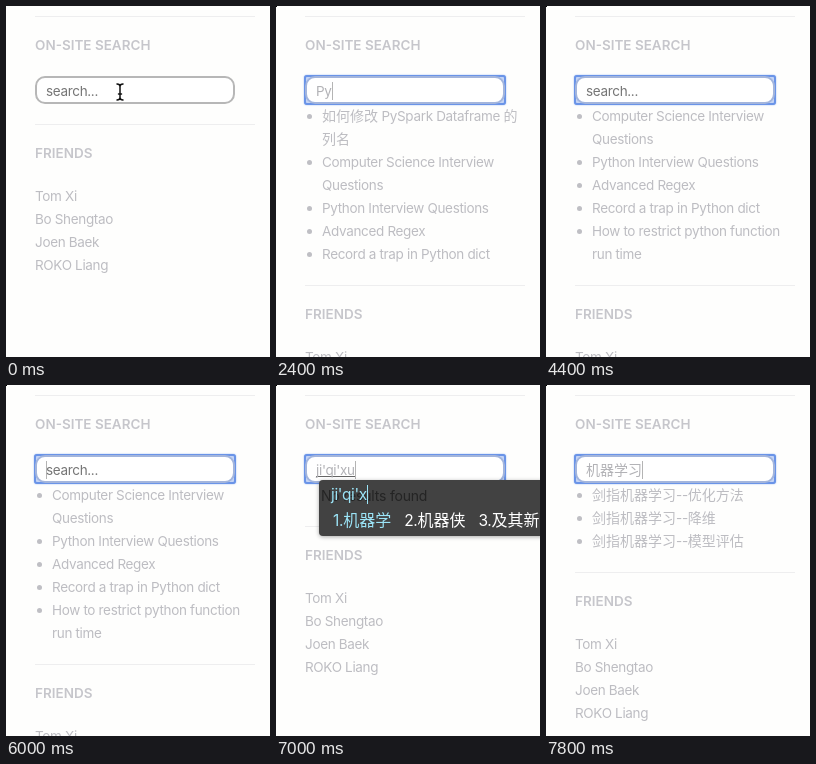
Animation of 264x351 px, one loop 8 s. Source, as an HTML page:

```html
<!DOCTYPE html>
<html lang="en">
<head>
<meta charset="utf-8">
<style>
  html, body { margin: 0; width: 100%; height: 100%; overflow: hidden; background: #fefefd; }
  body { position: relative; color: #bdbdc2; white-space: pre;
    font: 400 13.5px/23px Inter, "Noto Sans CJK SC", "Noto Sans CJK", sans-serif; letter-spacing: -.33px; }
  div, svg { position: absolute; box-sizing: border-box; }
  p { margin: 0; height: 23px; position: relative; }
  i { font: 400 14px/0 "Noto Sans CJK SC", "Noto Sans CJK", sans-serif; letter-spacing: 0; }
  .rule { left: 29px; width: 220px; height: 1px; background: #eeeeef; }
  .head { left: 29px; font-weight: 600; letter-spacing: 0; color: #c6c6cb; }
  #corner { left: 0; top: 0; width: 1px; height: 1px; background: #000; }
  #box { left: 29px; top: 70px; width: 200px; height: 28px; border: 2px solid #b7b7b7; border-radius: 10px; background: #fff; }
  #box.on { border-color: #a3b5dc; }
  #ring { left: 28px; top: 69px; width: 202px; height: 30px; border: 2px solid #6a94e8; border-radius: 3px;
    background: #c3d3f5; box-shadow: 0 0 1.5px #7fa5ee; }
  #field { left: 40px; top: 74px; color: #b2b2b6; }
  .hint { color: #757575; }
  .raw { border-bottom: 1.5px solid #666; display: inline-block; height: 17px; line-height: 23px; }
  #caret { display: inline-block; width: 1px; height: 18px; margin-right: -1px; vertical-align: -4px; background: #b4b4b4; }
  #list { left: 46px; top: 99px; }
  .dot::before { content: ""; position: absolute; left: -15.5px; top: 9px; width: 5px; height: 5px; border-radius: 50%; background: #bfbfc4; }
  #pop { left: 43px; top: 95px; width: 240px; height: 56px; border-radius: 4px; background: #424242; box-shadow: 0 1px 4px #0005; }
  #note { left: 2px; top: 4px; color: #242424; font-size: 14px; letter-spacing: -.2px; }
  #spell { left: 12px; top: 3px; font-size: 15.5px; color: #9be4f7; }
  #spell span { border-right: 1px solid #9be4f7; }
  #picks { left: 14px; top: 29px; display: flex; gap: 13px; color: #fff; font-size: 15.5px; }
  #picks > :first-child { color: #9be4f7; }
  #picks i { font-size: 16px; }
</style>
</head>
<body>
<div class="rule" style="top:10px"></div>
<div class="head" style="top:28px">ON-SITE SEARCH</div>
<div id="ring"></div>
<div id="box"></div>
<div id="field"></div>
<div id="list"></div>
<div id="friends" style="left:0;top:0">
  <div class="rule" style="top:118px"></div>
  <div class="head" style="top:136px">FRIENDS</div>
  <div style="left:29px;top:179px"><p>Tom Xi</p><p>Bo Shengtao</p><p>Joen Baek</p><p>ROKO Liang</p></div>
</div>
<div id="pop"><div id="note">No results found</div><div id="spell"></div><div id="picks"></div></div>
<svg id="mouse" width="16" height="24" viewBox="-8 -12 16 24" style="left:0;top:0" fill="none" stroke-linecap="round">
  <defs><path id="beam" d="M-3-8Q0-8 0-5.5Q0-8 3-8M0-5.5V5.5M-3 8Q0 8 0 5.5Q0 8 3 8M-1.5 2H1.5"/></defs>
  <use href="#beam" stroke="#fff" stroke-width="3.4"/>
  <use href="#beam" stroke="#111" stroke-width="1.5"/>
</svg>
<div id="corner"></div>
<script>
const LOOP = 8000, STEP = 200, LINE = 23;
const $ = id => document.getElementById(id);

// A leading "*" starts a bulleted entry; other lines continue it.
const shared = ["*Computer Science Interview", "Questions", "*Python Interview Questions", "*Advanced Regex", "*Record a trap in Python dict"];
const lists = {
  none: [],
  py: ["*如何修改 PySpark Dataframe 的", "列名", ...shared],
  python: [...shared, "*How to restrict python function", "run time"],
  empty: [""],
  learning: ["*剑指机器学习--优化方法", "*剑指机器学习--降维", "*剑指机器学习--模型评估"]
};

// start time, field text, caret shown, list
const states = [
  [0, "", 0, "none"],
  [600, "", 1, "none"],
  [2000, "P", 1, "py"],
  [2400, "Py", 1, "py"],
  [2600, "Pyt", 1, "python"],
  [2800, "Pyth", 1, "python"],
  [3000, "Python", 1, "python"],
  [3400, "Python", 0, "python"],
  [3800, "Python", 1, "python"],
  [4000, "", 1, "python"],
  [4400, "", 0, "python"],
  [5000, "", 1, "python"],
  [5400, "", 0, "python"],
  [6000, "", 1, "python"],
  [6400, "j", 1, "python"],
  [6600, "ji", 1, "empty"],
  [6800, "ji'qi", 1, "empty"],
  [7000, "ji'qi'xu", 1, "empty"],
  [7200, "ji'qi'xue", 1, "empty"],
  [7400, "ji'qi'xue'xi", 1, "empty"],
  [7800, "机器学习", 1, "learning"]
];

// start time, spelling, candidates
const popups = [
  [6600, "ji", "及 几 机 级"],
  [6800, "ji'qi", "机器 及其 极其"],
  [7000, "ji'qi'x", "机器学 机器侠 及其新"],
  [7200, "ji'qi'xue", "机器学 机器 及其"],
  [7400, "ji'qi'xue'xi", "机器学习 机器 及其"]
];

const at = (rows, t) => rows.filter(r => r[0] <= t).pop();
const show = (id, on) => $(id).style.display = on ? "" : "none";
const han = s => s.replace(/[\u3400-\u9fff]+/g, "<i>$&</i>");
const row = s => s[0] === "*" ? `<p class="dot">${han(s.slice(1))}</p>` : `<p>${han(s)}</p>`;

function draw(t) {
  const [, text, caret, name] = at(states, t);
  const lines = lists[name], composing = t >= 6400 && t < 7800;
  const bar = caret ? '<span id="caret"></span>' : "";
  $("field").innerHTML = text
    ? `<span class="${composing ? "raw" : ""}">${han(text)}</span>${bar}`
    : `${bar}<span class="hint">search...</span>`;
  $("list").innerHTML = lines.map(row).join("");
  $("friends").style.transform = `translateY(${lines.length * LINE}px)`;

  show("ring", t >= 600);
  $("box").className = t >= 600 ? "on" : "";
  show("corner", t >= 1800);
  show("mouse", t < 1800);
  const k = Math.min(t / 1200, 1), ease = k * k * (3 - 2 * k);
  $("mouse").style.transform = `translate(${106 + 6 * ease}px, ${74 - ease}px)`;

  const pop = composing && at(popups, t);
  show("pop", pop);
  if (pop) {
    $("spell").innerHTML = `<span>${pop[1]}</span>`;
    $("picks").innerHTML = pop[2].split(" ").map((w, n) => `<span>${n + 1}.${han(w)}</span>`).join("");
  }
}

let last = -1;
function tick() {
  const t = Math.floor(performance.now() % LOOP / STEP) * STEP;
  if (t !== last) draw(last = t);
  requestAnimationFrame(tick);
}
tick();
</script>
</body>
</html>
```
